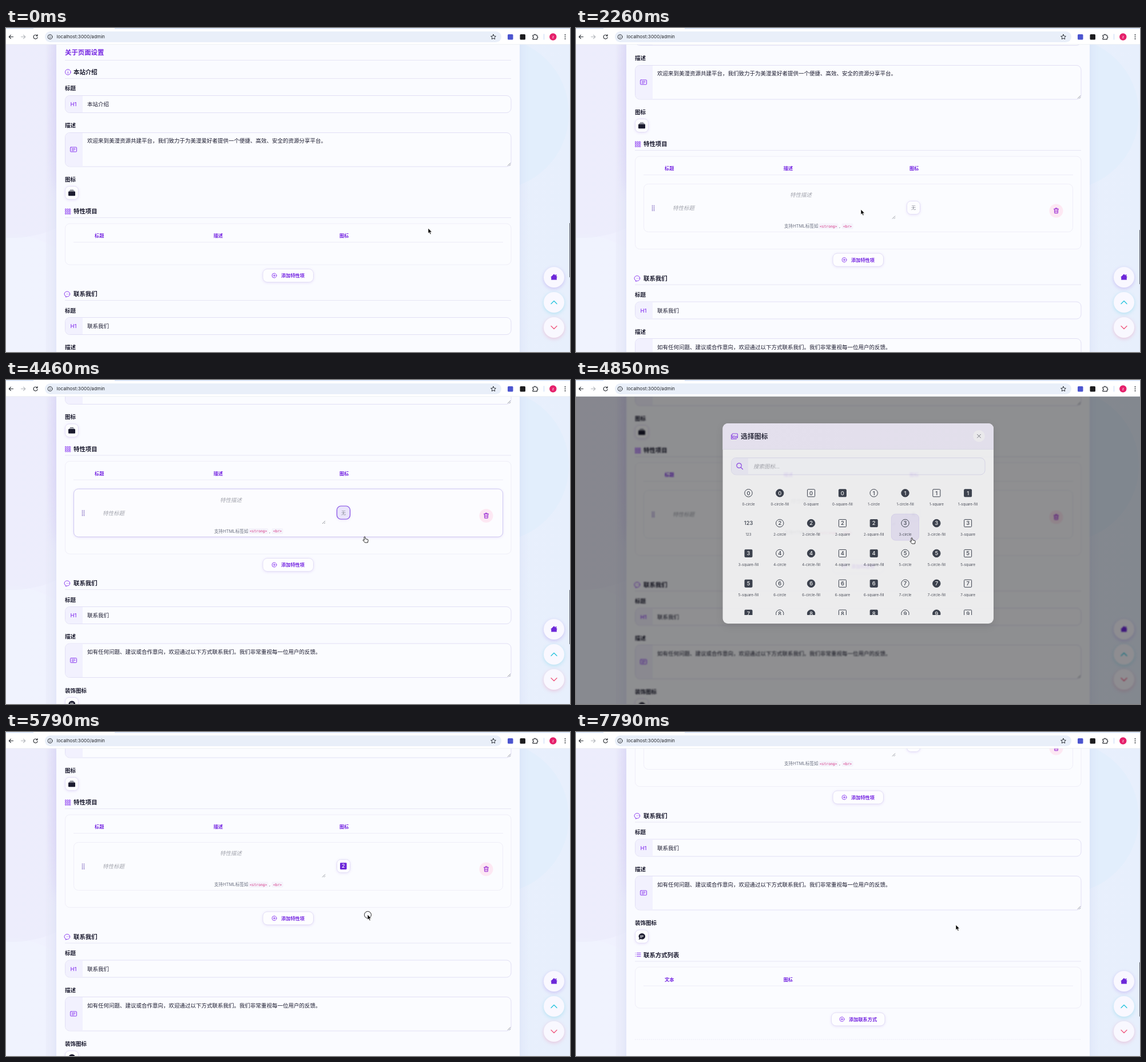
Write an HTML page that moves like this. It is 986 by 568 pixels and loops after 8000 ms.

```html
<!DOCTYPE html>
<html lang="zh-CN">
<head>
<meta charset="utf-8">
<title>admin</title>
<style>
html, body { margin: 0; width: 100%; height: 100%; overflow: hidden; background: #fff; }
svg { display: block; }
#stage {
  --s: 0; --x: 738; --y: 351; --hand: 0; --row: 0; --hov: 0; --ico: 0; --btn: 0;
  --m: 0; --mo: 0; --hx: 575.4; --blur: none; --picked: 0; --ring: 0; --bar: 1;
  animation: play 8s step-end infinite;
  font-family: Inter, "Noto Sans CJK SC", "Noto Sans CJK", sans-serif;
  font-size: 9.5px; fill: #1b1b2f;
}
/* s: scroll, x/y: pointer, m: dialog shown, mo: dialog opacity, hx: hovered cell */
@keyframes play {
  0%     { --s: 0; --x: 738; --y: 351; --hand: 0; --row: 0; --hov: 0; --ico: 0; --btn: 0; --m: 0; --mo: 0; --hx: 575.4; --blur: none; --picked: 0; --ring: 0; --bar: 1; }
  3.25%  { --s: 14; --x: 726; --y: 353; }
  5.87%  { --s: 34; --x: 712; --y: 356; }
  10.25% { --s: 54; --x: 690; --y: 357; }
  12.75% { --s: 86; --x: 662; --y: 359; }
  15.37% { --s: 110; --x: 646; --y: 360; }
  17.62% { --s: 117; --x: 600; --y: 348; }
  19.37% { --s: 118; --x: 545; --y: 334; }
  21.25% { --x: 508; --y: 322; --hand: 1; --btn: 1; }
  23.5%  { --x: 498; --y: 318; }
  26.12% { --row: 1; --btn: 0; --hand: 0; }
  28.75% { --x: 520; --y: 345; }
  31.25% { --s: 126; --x: 580; --y: 400; }
  33.75% { --s: 140; --x: 630; --y: 435; }
  36.75% { --s: 152; --x: 655; --y: 443; }
  40.12% { --s: 180; }
  43.12% { --s: 200.5; }
  47.62% { --x: 640; --y: 330; }
  50.37% { --x: 606; --y: 252; --hov: 1; }
  53%    { --x: 592; --y: 236; --hand: 1; --ico: 1; }
  55.75% { --x: 627; --y: 275; }
  60.62% { --s: 198; --x: 587; --y: 277; --hov: 0; --ico: 0; --m: 1; --mo: .84; --blur: blur(1.3px); --bar: 0; }
  64.25% { --x: 628; --y: 262; --hx: 630.2; --mo: 1; --blur: blur(2.6px); }
  68.37% { --x: 520; --y: 258; --hx: 520.6; }
  72.37% { --x: 632; --y: 320; --hand: 0; --m: 0; --mo: 0; --blur: none; --picked: 1; --ring: 1; }
  75.37% { --x: 640; --y: 326; --ring: 0; }
  79.12% { --s: 206; --x: 648; --y: 331; }
  82.5%  { --s: 240; --x: 656; --y: 335; --bar: 1; }
  86.25% { --s: 300; --x: 660; --y: 337; }
  89.5%  { --s: 350; --x: 663; --y: 338; }
  93.25% { --s: 394; --x: 664; --y: 338; }
  97.37% { --s: 410; }
}
#page { filter: var(--blur); }
#doc { transform: translateY(calc(var(--s) * -1px)); }
#below { transform: translateY(calc(var(--row) * 90.5px)); }
#list { height: calc(72px + var(--row) * 90.5px); }
#item { opacity: var(--row); }
#itemHov { opacity: var(--hov); }
#icoHov { opacity: var(--ico); }
#btnHov { opacity: var(--btn); }
#none { opacity: calc(1 - var(--picked)); }
#two { opacity: var(--picked); }
#dim { opacity: calc(var(--m) * .43); }
#dialog { opacity: var(--mo); }
#cell { transform: translateX(calc(var(--hx) * 1px)); }
#thumb { opacity: var(--bar); transform: translateY(calc(342px + var(--s) * .17px - var(--row) * 8px)); }
#pointer { transform: translate(calc(var(--x) * 1px), calc(var(--y) * 1px)); }
#arrow { opacity: calc(1 - var(--hand)); }
#hand { opacity: var(--hand); }
#ring { opacity: var(--ring); }
.h { font-size: 10.4px; font-weight: 600; }
.b { font-weight: 600; }
.th { font-size: 8.2px; font-weight: 600; fill: #7424e2; }
.ph { font-style: italic; fill: #a3a5ae; }
.code { font: 6.3px "DejaVu Sans Mono", "Liberation Mono", monospace; fill: #d63384; }
.ln { stroke: #e6e5f4; fill: none; }
.box { fill: #fbfcff; stroke: #e1dff5; }
.pane { fill: #f2f1fe; }
.tbl { fill: #fbfcff; stroke: #efeef8; }
.btn { fill: #fdfdff; stroke: #e3dff6; filter: drop-shadow(0 1px 2px rgba(109,40,217,.13)); }
.i { fill: none; stroke: #8b3cf0; stroke-linecap: round; stroke-linejoin: round; }
.nav { fill: none; stroke: #30343a; stroke-width: 1.2; stroke-linecap: round; stroke-linejoin: round; }
.mid { text-anchor: middle; }
</style>
</head>
<body>
<svg id="stage" width="986" height="568" viewBox="0 0 986 568">
<defs>
  <linearGradient id="bg"><stop offset="0" stop-color="#f0f1fe"/><stop offset="1" stop-color="#e7effc"/></linearGradient>
  <linearGradient id="head"><stop offset="0" stop-color="#f3effe"/><stop offset="1" stop-color="#f1edfc"/></linearGradient>
  <filter id="soft" x="-30%" y="-30%" width="160%" height="160%"><feGaussianBlur stdDeviation="9"/></filter>
  <clipPath id="view"><rect y="29" width="986" height="539"/></clipPath>
  <clipPath id="gridClip"><rect x="271" y="172" width="446" height="240"/></clipPath>
  <path id="grip" class="ln" d="M0 0l5-5M3 0l2-2" style="stroke:#777b85;stroke-width:.8"/>
  <g id="lines" class="i"><rect x="-5.5" y="-4" width="11" height="8" rx="1"/><path d="M-3-1.6h6M-3 .2h6M-3 2h3.5" stroke-width=".8"/></g>
  <g id="input">
    <rect class="box" x="103.5" y=".5" width="779.5" height="30" rx="8"/>
    <path class="pane" d="M134 1v29h-22.500a7.500 7.500 0 0 1-7.500-7.500v-14a7.500 7.500 0 0 1 7.500-7.500z"/>
    <text class="mid" x="118" y="19" style="fill:#8b3cf0;font-weight:500">H1</text>
  </g>
  <g id="area">
    <rect class="box" x="103.500" y=".5" width="779.500" height="59.500" rx="8"/>
    <path class="pane" d="M134 1v58.500h-22.500a7.500 7.500 0 0 1-7.500-7.500v-43.500a7.500 7.500 0 0 1 7.500-7.500z"/>
    <use href="#lines" x="118" y="30"/><use href="#grip" x="877" y="58.500"/>
  </g>
  <rect id="sq" class="btn" x="-11.500" y="-11.500" width="23" height="23" rx="7"/>
  <g id="plus" class="i" stroke-width=".9"><circle r="4"/><path d="M-1.900 0h3.800M0-1.900v3.800"/></g>
</defs>

<g clip-path="url(#view)">
  <rect y="29" width="986" height="539" fill="url(#bg)"/>
  <circle cx="-10" cy="560" r="200" fill="#f1f4ff" opacity=".7"/>
  <circle cx="10" cy="180" r="188" fill="#ecebfc" opacity=".55"/>
  <circle cx="850" cy="150" r="134" fill="#e0eefc" opacity=".75"/>
  <rect x="70" y="29" width="18" height="539" fill="#e9eafa" opacity=".5"/>
  <ellipse cx="92" cy="130" rx="12" ry="160" fill="#ddd2f8" filter="url(#soft)" opacity=".8"/>
  <rect x="88" y="0" width="810" height="600" fill="#cfd6f3" filter="url(#soft)" opacity=".6"/>

  <g id="page">
    <rect x="88" y="0" width="810" height="600" fill="#fafbff"/>
    <g id="doc">
      <text x="103" y="46.700" style="font-size:11.400px;font-weight:600;fill:#7424e2">关于页面设置</text>
      <path class="ln" d="M103 56.500h780"/>
      <g class="i"><circle cx="108.300" cy="77.300" r="4.800"/><path d="M108.300 76.800v3M108.300 74.700v.1"/></g>
      <text class="h" x="118" y="81">本站介绍</text>
      <path class="ln" d="M103 88.500h780"/>
      <text class="b" x="103" y="109.300">标题</text>
      <use href="#input" y="118"/>
      <text x="142" y="137.300">本站介绍</text>
      <text class="b" x="103" y="174.300">描述</text>
      <use href="#area" y="183"/>
      <text x="142" y="201.300">欢迎来到美漫资源共建平台，我们致力于为美漫爱好者提供一个便捷、高效、安全的资源分享平台。</text>
      <text class="b" x="103" y="268.600">图标</text>
      <use href="#sq" x="115" y="289"/>
      <rect x="109" y="286.500" width="12" height="7.800" rx="1"/>
      <path d="M110.500 285.700h9M112 284h6" stroke="#555867" stroke-width="1"/>
      <g id="dots9" class="i" stroke-width=".8"></g>
      <text class="h" x="118" y="325.300">特性项目</text>
      <path class="ln" d="M103 332.500h780"/>

      <rect id="list" class="tbl" x="103.500" y="343" width="779.500" rx="8"/>
      <text class="th" x="155" y="367">标题</text><text class="th" x="362.700" y="367">描述</text><text class="th" x="583" y="367">图标</text>
      <path class="ln" d="M118 375.500h751" style="stroke:#edecf7"/>
      <g id="item">
        <rect class="tbl" x="118.500" y="391.500" width="750" height="84" rx="8"/>
        <rect id="itemHov" x="118.500" y="391.500" width="750" height="84" rx="8" fill="#fcfcff" stroke="#cfc9f2" style="filter:drop-shadow(0 1px 2px rgba(109,40,217,.12))"/>
        <path d="M133.500 428.800v10M136.500 428.800v10" stroke="#6b4fb5" stroke-width="1.300" stroke-dasharray="1.300 .9"/>
        <text class="ph" x="169" y="437">特性标题</text>
        <text class="ph" x="374" y="414">特性描述</text>
        <use href="#grip" x="553" y="452.500"/>
        <text x="364" y="468.300" style="font-size:7.600px;fill:#6b7080">支持HTML标签如</text>
        <rect x="424" y="460.500" width="34.500" height="10" rx="2" fill="#f5f3fb"/>
        <text class="code" x="426" y="467.700">&lt;strong&gt;</text>
        <text x="460" y="468" style="font-size:7.600px;fill:#6b7080">,</text>
        <rect x="464.500" y="460.500" width="20" height="10" rx="2" fill="#f5f3fb"/>
        <text class="code" x="467" y="467.700">&lt;br&gt;</text>
        <use href="#sq" x="590" y="433"/>
        <rect id="icoHov" x="578.500" y="421.500" width="23" height="23" rx="7" fill="#eae5fb" stroke="#8550e6" stroke-width="1.200"/>
        <text id="none" class="mid" x="590" y="436" style="font-size:8.200px;fill:#888b96">无</text>
        <g id="two"><rect x="584" y="427.300" width="11.600" height="11.600" rx="1.300" fill="#6d28d9"/>
          <text class="mid" x="589.800" y="436.300" style="font-size:8.800px;font-weight:500;fill:#fff">2</text></g>
        <circle cx="839.500" cy="438.500" r="12" fill="#fde8f3"/>
        <path class="i" style="stroke:#9420d2" d="M835.500 435.300h8M838 435v-1.200h3v1.200M836.300 435.500l.5 7.200h5.400l.5-7.200M838.300 437.500v3.200M840.700 437.500v3.200"/>
      </g>

      <g id="below">
        <rect class="btn" x="449" y="422.500" width="88.500" height="23" rx="8"/>
        <rect id="btnHov" x="449" y="422.500" width="88.500" height="23" rx="8" fill="#f1ecfe" stroke="#b79af0"/>
        <use href="#plus" x="469" y="434"/>
        <text class="th" x="481" y="437">添加特性项</text>

        <g class="i"><path d="M104.800 470.500a4.900 4.500 0 1 1 2.500 .4l-3 .6z"/><path d="M106.200 466.300v.1M108.400 466.300v.1M110.600 466.300v.1"/></g>
        <text class="h" x="118" y="470">联系我们</text>
        <path class="ln" d="M103 477.500h780"/>
        <text class="b" x="103" y="498.500">标题</text>
        <use href="#input" y="507"/>
        <text x="142" y="526">联系我们</text>
        <text class="b" x="103" y="563.300">描述</text>
        <use href="#area" y="571.500"/>
        <text x="142" y="590">如有任何问题、建议或合作意向，欢迎通过以下方式联系我们。我们非常重视每一位用户的反馈。</text>
        <text class="b" x="103" y="657.500">装饰图标</text>
        <use href="#sq" x="115" y="678"/>
        <path d="M109.500 683.500l1.200-2.500a5.800 5.300 0 1 1 2.300 1.600z"/>
        <path d="M112 676.300h6M112 678h6M112 679.700h3.500" stroke="#fff" stroke-width=".8"/>
        <path class="i" d="M106.500 707h6.500M106.500 710h6.500M106.500 713h6.500M104 707h.1M104 710h.1M104 713h.1"/>
        <text class="h" x="118" y="714.200">联系方式列表</text>
        <path class="ln" d="M103 721.500h780"/>
        <rect class="tbl" x="103.500" y="731.500" width="779.500" height="72" rx="8"/>
        <text class="th" x="155" y="756">文本</text><text class="th" x="362.700" y="756">图标</text>
        <path class="ln" d="M118 764.500h751" style="stroke:#edecf7"/>
        <rect class="btn" x="446.500" y="811.500" width="93.500" height="23" rx="8"/>
        <use href="#plus" x="465" y="823"/>
        <text class="th" x="477" y="826">添加联系方式</text>
        <path class="ln" d="M103 858.500h780" stroke-dasharray="2 1.500" style="stroke:#ebeaf6"/>
      </g>
    </g>
    <g fill="#f9f8ff">
      <circle cx="958" cy="437" r="18" style="filter:drop-shadow(0 2px 3px rgba(109,40,217,.22))"/>
      <circle cx="958" cy="481" r="18" style="filter:drop-shadow(0 2px 3px rgba(34,190,220,.25))"/>
      <circle cx="958" cy="525" r="18" style="filter:drop-shadow(0 2px 3px rgba(240,80,130,.25))"/>
    </g>
    <path d="M952 437l6-5.800 2.800 2.700v-1.900h1.500v3.300l1.700 1.700h-1.200v4.600h-9.600v-4.600z" fill="#6d28d9"/>
    <path class="i" style="stroke:#25c4de;stroke-width:1.300" d="M953 483.500l5-5 5 5"/>
    <path class="i" style="stroke:#ef5880;stroke-width:1.300" d="M953 522.500l5 5 5-5"/>
  </g>

  <rect id="thumb" x="985" width="1" height="95" fill="#5c606b"/>
  <rect id="dim" y="29" width="986" height="539" fill="#000"/>

  <g id="dialog">
    <rect x="256.500" y="76" width="473.500" height="351" rx="9" fill="#fdfdfe" style="filter:drop-shadow(0 4px 8px rgba(0,0,0,.12))"/>
    <path d="M256.500 121.500v-36.500a9 9 0 0 1 9-9h455.500a9 9 0 0 1 9 9v36.500z" fill="url(#head)"/>
    <path class="ln" d="M256.500 121.500h473.500"/>
    <g class="i" stroke-width="1.100"><rect x="273" y="94" width="9.500" height="7.500" rx="1"/><path d="M271.500 96v7.500h9M273.500 100.500l2.700-2.700 2.200 2 1.700-1.500 2 2.200"/></g>
    <text x="288" y="102.900" style="font-size:11.900px;font-weight:600">选择图标</text>
    <circle cx="704.500" cy="98.300" r="10.300" fill="#fbfafd"/>
    <path d="M701.300 95.100l6.400 6.400M707.700 95.100l-6.400 6.400" stroke="#686b76" stroke-width="1"/>
    <rect class="box" x="271.500" y="136.500" width="443.500" height="29.500" rx="8"/>
    <path class="pane" d="M301 137v28.500h-21.500a7.500 7.500 0 0 1-7.500-7.500v-13.500a7.500 7.500 0 0 1 7.500-7.500z"/>
    <path class="i" style="stroke-width:1.200" d="M288.500 153.500l3 3M289.300 150a4.200 4.200 0 1 1-8.400 0a4.200 4.200 0 1 1 8.400 0"/>
    <text class="ph" x="310" y="154.500">搜索图标...</text>
    <rect id="cell" x="-24" y="235" width="48" height="46" rx="7" fill="#ece7fb" stroke="#e0d9f7"/>
    <g id="grid" clip-path="url(#gridClip)"></g>
  </g>
</g>

<g>
  <rect width="986" height="29" fill="#fff"/>
  <path d="M0 0h48v1.500h-48zM190 0h796v1.500h-796z" fill="#d5e3fa"/>
  <path d="M0 28.700h986" stroke="#e3e6ec" stroke-width=".6"/>
  <rect x="68" y="6" width="798" height="19" rx="9.500" fill="#e9eff9"/>
  <path class="nav" d="M12.500 15.500h-7M8.500 12.300l-3.200 3.200 3.200 3.200"/>
  <path class="nav" style="stroke:#b4b7bc" d="M26.500 15.500h7M30.500 12.300l3.200 3.200-3.200 3.200"/>
  <path class="nav" d="M54.300 13.300a3.500 3.500 0 1 0 .7 3M55 11.500v2.300h-2.300"/>
  <g class="nav" style="stroke-width:1"><circle cx="77" cy="15.500" r="3.900"/><path d="M77 15.300v2M77 13.600v.1"/></g>
  <text x="88.500" y="18.400" style="font-size:8.200px;fill:#24272c">localhost:3000/admin</text>
  <path class="nav" style="stroke-width:1" d="M852 11.300l1.300 2.800 3.100 .4-2.300 2.100 .6 3-2.700-1.500-2.700 1.500 .6-3-2.300-2.100 3.100-.4z"/>
  <rect x="877" y="11" width="9.500" height="9.500" rx="1.500" fill="#4c55cf"/>
  <rect x="898.500" y="11" width="9.500" height="9.500" rx="1.500" fill="#1d1d1f"/>
  <path class="nav" d="M921 12.500h2.300a1.400 1.400 0 0 1 2.800 0h2.300v2.300a1.400 1.400 0 0 1 0 2.800v2.300h-7.400v-2.300a1.400 1.400 0 0 0 0-2.800z"/>
  <path d="M940.500 10.500v10" stroke="#c6d8f7"/>
  <circle cx="956.300" cy="15.500" r="6.200" fill="#e5206b"/>
  <text class="mid" x="956.300" y="17.700" style="font-size:6px;fill:#fff">z</text>
  <g fill="#30343a"><circle cx="977.500" cy="12" r="1"/><circle cx="977.500" cy="15.500" r="1"/><circle cx="977.500" cy="19" r="1"/></g>
</g>

<g id="pointer">
  <circle id="ring" cx=".5" cy=".5" r="6" fill="none" stroke="#222" stroke-width="1"/>
  <path id="arrow" d="M0 0v9.200l2.100-1.900 1.500 3.500 1.600-.7-1.500-3.300h2.900z" fill="#000" stroke="#fff" stroke-width=".7"/>
  <path id="hand" d="M-1 .7a1 1 0 0 1 2 0l.6 3 3.400 .6q1.400 .5 1.100 2l-.7 3.700h-4.900l-3.300-3.700q-.5-1.200 .9-1.200l1.300 .9z" fill="#fff" stroke="#111" stroke-width=".9" stroke-linejoin="round"/>
</g>
</svg>
<script>
const put = (id, html) => { document.getElementById(id).innerHTML = html; };

put('dots9', Array.from({ length: 9 }, (_, i) =>
  `<rect x="${103.5 + i % 3 * 3.5}" y="${317.2 + (i / 3 | 0) * 3.5}" width="2.3" height="2.3" rx=".5"/>`).join(''));

const names = [];
for (let n = 0; n < 10; n++) {
  for (const kind of ['circle', 'circle-fill', 'square', 'square-fill']) names.push(`${n}-${kind}`);
  if (n === 1) names.push('123');
}

const dark = '#2b3240';
function glyph(name) {
  const label = (color, text) =>
    `<text class="mid" y="3.4" style="font-size:9.4px;font-weight:500;fill:${color}">${text}</text>`;
  if (name === '123') return label(dark, name);
  const full = name.endsWith('fill');
  const paint = `fill="${full ? dark : 'none'}" stroke="${dark}"`;
  const shape = name.includes('circle')
    ? `<circle r="6.7" ${paint}/>`
    : `<rect x="-6.5" y="-6.5" width="13" height="13" rx="1.2" ${paint}/>`;
  return shape + label(full ? '#fff' : dark, name[0]);
}

put('grid', names.slice(0, 40).map((name, i) =>
  `<g transform="translate(${301.5 + i % 8 * 54.8} ${198.2 + (i / 8 | 0) * 52.85})">${glyph(name)}` +
  `<text class="mid" y="21.8" style="font-size:6.05px;fill:#3b3f4c">${name}</text></g>`).join(''));
</script>
</body>
</html>
```
